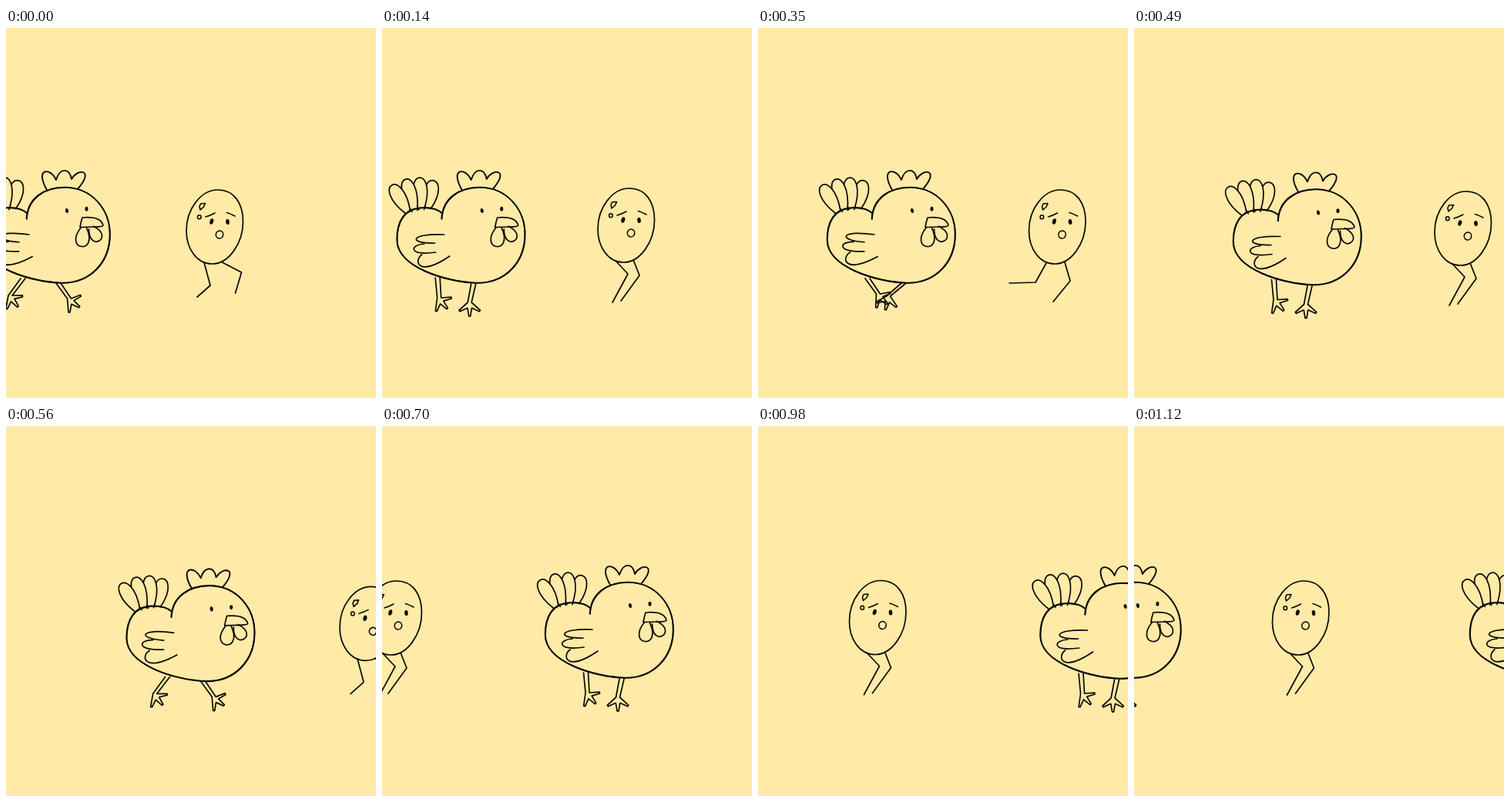
An HTML page with a canvas that plays this animation: 480 px wide and 480 px high, repeating every 1.19 s.

```html
<!DOCTYPE html>
<html>
<head>
<meta charset="utf-8">
<style>
html, body { margin: 0; width: 100%; height: 100%; overflow: hidden; background: #ffeaa7; }
canvas { display: block; }
</style>
</head>
<body>
<canvas id="stage" width="480" height="480"></canvas>
<script>
const ctx = document.getElementById('stage').getContext('2d');
const STEP = 70, COUNT = 17, PERIOD = 541;
const PAPER = '#ffeaa7', INK = '#080804';

// Step, hen x and y, egg x and y
const keys = [
  [0, -76, 0, 270.5, 258],
  [3, 0, 0, 339.5, 255],
  [5, 45, 0, 388, 258],
  [7, 84, 2.5, 426.5, 260],
  [10, 167, -4, 555.5, 249],
  [12, 252, -2, 635, 248],
  [16, 391, -4, 757, 249]
];

// Hip x, hip y, ankle x, ankle y, foot direction
const henLegs = {
  A: [[98, 325, 81.5, 347, 0.9], [144, 331, 158, 351, 0.6]],
  B: [[97.5, 324, 99.5, 350, 0.85], [144, 332, 139, 356, 1.57]],
  C: [[97, 325, 111, 345, 0.75], [144, 331, 124, 348, 1.8]]
};

// Knee and foot, left then right
const eggLegs = {
  A: [[-5.5, 76, -22.5, 91], [35, 59, 27, 86]],
  B: [[2.5, 63, -17.5, 100], [17.5, 65, -6.5, 98]],
  C: [[-28, 72, -62, 73], [17, 70, -5, 97]]
};

const bodyShape = new Path2D('M103 248C104 222 125 207 152 207C188 207 211 236 211 268' +
  'C211 304 186 331 149 331C110 330 45 311 45 275C45 252 54 234 78 233.5C92 233 100 237 104 241');
const combShape = new Path2D('M129 210C113 182 133 180 141 197C146 181 158 181 161 196C170 181 191 184 169 209');
const beakShape = new Path2D('M172 258.5Q173 252 175 246Q199 244 202 256Q202 258 190 258Z');
const wingShape = new Path2D('M106 268C62 266 58 280 94 279M80 280C62 281 58 296 95 291M77 294C66 302 72 324 113 296');
const eggShape = new Path2D('M4 -48C26 -48 37 -30 37 -7C37 22 18 48 -3 48C-24 48 -36.5 27 -36.5 5C-36.5 -24 -17 -48 4 -48Z');
const eggFace = new Path2D('M-18 -30L-12 -30.5L-14 -26L-18.5 -22L-19.5 -26.5Z' +
  'M-11.5 -13Q-5 -15 0.5 -18M16 -18.5Q21 -17 26.5 -14');

function stroke(shape, width = 1.7) {
  ctx.lineWidth = width;
  ctx.stroke(shape);
}

function line(points, width = 1.7) {
  const shape = new Path2D();
  points.forEach(p => shape.lineTo(...p));
  stroke(shape, width);
}

function oval(x, y, rx, ry, turn = 0, width = 0) {
  const shape = new Path2D();
  shape.ellipse(x, y, rx, ry, turn, 0, Math.PI * 2);
  if (width) stroke(shape, width); else ctx.fill(shape);
}

// Rounded leaf from a base of the given gap to its tip
function petal(x, y, tipX, tipY, width, gap) {
  const dx = tipX - x, dy = tipY - y, len = Math.hypot(dx, dy);
  const nx = -dy / len, ny = dx / len;
  const cx = x + dx / 0.75, cy = y + dy / 0.75;
  const shape = new Path2D();
  shape.moveTo(x - nx * gap, y - ny * gap);
  shape.bezierCurveTo(cx - nx * width, cy - ny * width, cx + nx * width, cy + ny * width, x + nx * gap, y + ny * gap);
  ctx.fillStyle = PAPER;
  ctx.fill(shape);
  ctx.fillStyle = INK;
  stroke(shape);
}

function henLeg([hipX, hipY, x, y, dir]) {
  const spread = 0.97;
  const polar = (a, r) => [x + Math.cos(a) * r, y + 2 + Math.sin(a) * r];
  const points = [[hipX - 3, hipY], [x - 2.5, y]];
  for (let k = 1; k >= -1; k--) {
    const a = dir + k * spread;
    points.push(polar(a + 0.06, 16), polar(a - 0.06, 16));
    if (k > -1) points.push(polar(a - spread / 2, 6));
  }
  points.push([x + 2.5, y], [hipX + 3, hipY]);
  line(points);
}

function hen(x, y, pose) {
  ctx.save();
  ctx.translate(x, y);
  henLegs[pose].forEach(henLeg);
  for (let i = 3; i >= 0; i--) {
    petal(59 + 8.7 * i, 239 - 1.7 * i, 38 + 18 * i, 194 + 2.9 * (i - 1.85) ** 2, 25, 3.5);
  }
  stroke(bodyShape);
  ctx.translate(-0.4, -0.5);
  stroke(bodyShape);
  ctx.translate(0.4, 0.5);
  stroke(combShape, 1.9);
  oval(155, 237, 2, 3.1, -0.15);
  oval(180.5, 234.7, 2, 2.9);
  petal(177, 259, 174, 283.5, 24, 3.5);
  petal(186.5, 259, 197, 276, 20, 3.5);
  stroke(beakShape);
  if (pose !== 'B') {
    ctx.translate(106, 268);
    ctx.rotate(0.1);
    ctx.translate(-106, -268);
  }
  stroke(wingShape);
  ctx.restore();
}

function egg(x, y, pose) {
  ctx.save();
  ctx.translate(x, y);
  eggLegs[pose].forEach(([kneeX, kneeY, footX, footY], i) =>
    line([[i ? 10 : -13.5, 46], [kneeX, kneeY], [footX, footY]]));
  stroke(eggShape);
  stroke(eggFace, 1.6);
  oval(-19.7, -12.8, 2.3, 2.5, 0, 1.5);
  oval(-3.7, -7, 2.4, 3.8, 0.25);
  oval(17, -6.6, 2.3, 3.5, -0.1);
  oval(6.5, 10, 4.7, 5, 0.3, 1.6);
  ctx.restore();
}

function place(n) {
  const i = Math.max(1, keys.findIndex(k => k[0] >= n));
  const a = keys[i - 1], b = keys[i];
  const t = (n - a[0]) / (b[0] - a[0]);
  return a.map((v, j) => v + (b[j] - v) * t).slice(1);
}

function draw(n) {
  ctx.fillStyle = PAPER;
  ctx.fillRect(0, 0, 480, 480);
  ctx.strokeStyle = ctx.fillStyle = INK;
  ctx.lineCap = ctx.lineJoin = 'round';
  const pose = 'ABCB'[(Math.min(n, 15) >> 1) % 4];
  const [henX, henY, eggX, eggY] = place(n);
  for (const shift of [0, PERIOD]) {
    hen(henX - shift, henY, pose);
    egg(eggX - shift, eggY, pose);
  }
}

const start = performance.now();
function tick() {
  draw(Math.floor((performance.now() - start) / STEP) % COUNT);
  requestAnimationFrame(tick);
}
tick();
</script>
</body>
</html>
```
